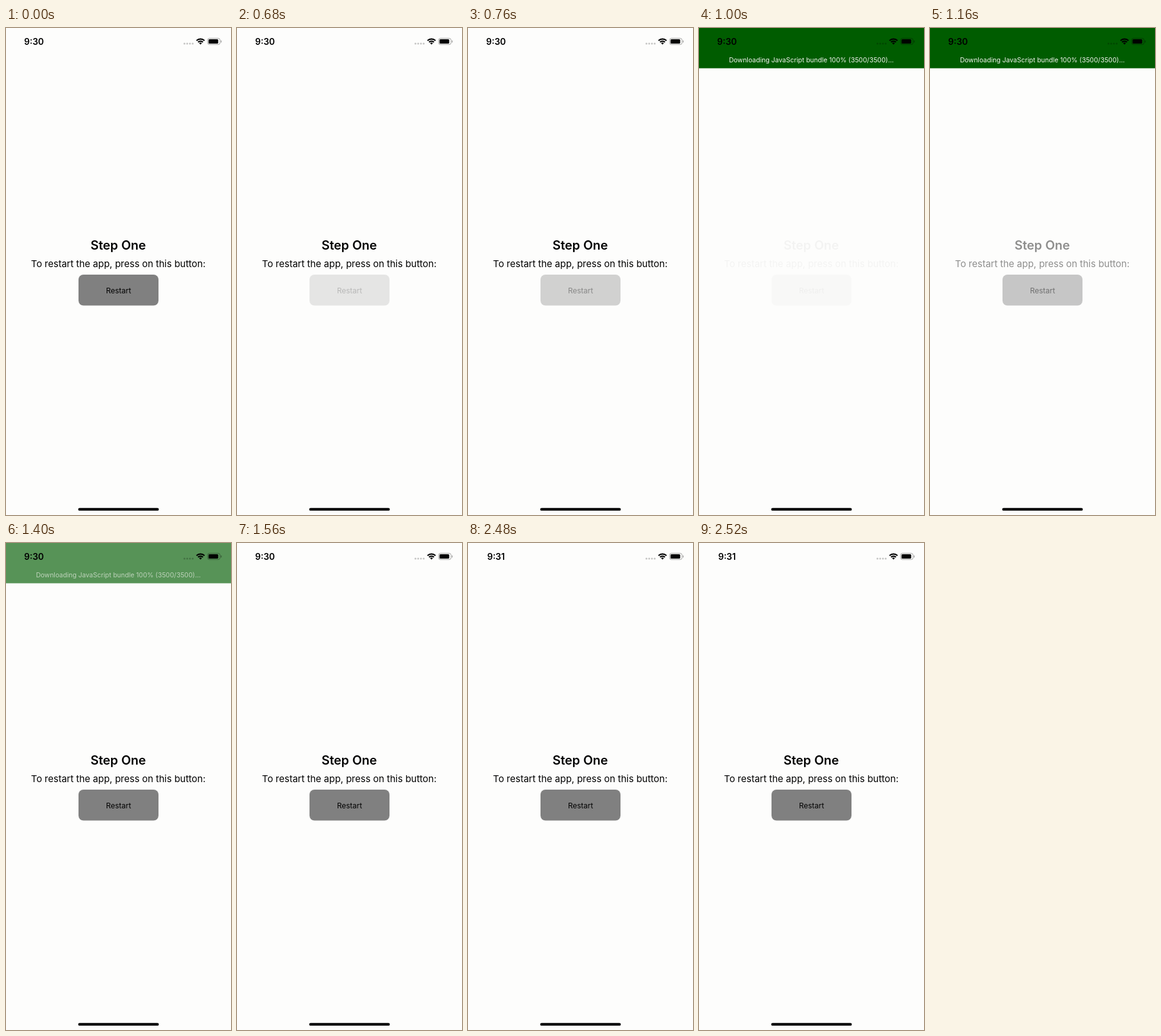
An HTML page with a canvas that plays this animation: 360 px wide and 780 px high, repeating every 2560 ms.

```html
<!DOCTYPE html>
<html lang="en">
<head>
<meta charset="utf-8">
<title>Restart button</title>
<style>
html, body { margin: 0; width: 100%; height: 100%; overflow: hidden; background: #fdfdfc; }
canvas { display: block; width: 360px; height: 780px; }
</style>
</head>
<body>
<canvas id="stage"></canvas>
<script>
const W = 360, H = 780, LOOP = 2560, STEP = 40;
const PAPER = '#fdfdfc', INK = '#000', GREEN = '#005c00';
const PRESS = 680, BANNER = 800, RELOAD = 920, MINUTE = 2480;
const canvas = document.getElementById('stage');
const ctx = canvas.getContext('2d');
const dpr = window.devicePixelRatio || 1;
canvas.width = W * dpr;
canvas.height = H * dpr;
ctx.scale(dpr, dpr);

const ramp = (t, from, to) => Math.min(1, Math.max(0, (t - from) / (to - from)));
const ease = k => k * k * (3 - 2 * k);

function box(x, y, w, h, r, color) {
  ctx.fillStyle = color;
  ctx.beginPath();
  ctx.roundRect(x, y, w, h, r);
  ctx.fill();
}

function label(text, x, y, size, weight = 400, color = INK) {
  ctx.font = `${weight} ${size}px Inter, "Noto Sans", sans-serif`;
  ctx.textAlign = 'center';
  ctx.fillStyle = color;
  ctx.fillText(text, x, y);
}

function faded(alpha, draw) {
  if (alpha <= 0) return;
  ctx.save();
  ctx.globalAlpha = alpha;
  draw();
  ctx.restore();
}

function button() {
  box(116, 395, 128, 49.5, 8, '#808080');
  label('Restart', 180, 424.5, 12);
}

function content() {
  label('Step One', 179.5, 355, 20, 600);
  label('To restart the app, press on this button:', 179.7, 382.5, 15);
}

function banner() {
  box(0, 0, W, 64.6, 0, GREEN);
  label('Downloading JavaScript bundle 100% (3500/3500)...', 179.7, 55, 10.5, 400, '#f4f4f0');
}

function wifi(x, y) {
  ctx.strokeStyle = ctx.fillStyle = INK;
  ctx.lineWidth = 2.2;
  const a = Math.PI * 0.25;
  for (const r of [5.5, 9]) {
    ctx.beginPath();
    ctx.arc(x, y, r, -Math.PI / 2 - a, -Math.PI / 2 + a);
    ctx.stroke();
  }
  ctx.beginPath();
  ctx.moveTo(x, y);
  ctx.arc(x, y, 3.1, -Math.PI / 2 - a, -Math.PI / 2 + a);
  ctx.fill();
}

function battery() {
  const shade = 'rgba(0, 0, 0, 0.35)';
  ctx.strokeStyle = shade;
  ctx.lineWidth = 1;
  ctx.beginPath();
  ctx.roundRect(322.5, 16.5, 20, 10, 3);
  ctx.stroke();
  box(324, 18, 15.5, 7, 1.5, INK);
  box(343.8, 19.8, 1.3, 3.6, 0.7, shade);
}

function statusBar(t) {
  label(t < MINUTE ? '9:30' : '9:31', 44.8, 26.5, 14, 600);
  for (let i = 0; i < 4; i++) box(284 + i * 4.4, 23.5, 3, 3, 1.5, 'rgba(0, 0, 0, 0.22)');
  wifi(311.2, 26.6);
  battery();
}

function draw(now) {
  const t = Math.floor((now % LOOP) / STEP) * STEP;
  box(0, 0, W, H, 0, PAPER);

  if (t < RELOAD) {
    content();
    const press = t < PRESS ? 1 : 0.2 + 0.8 * ease(ramp(t, 690, 940));
    faded(press, button);
  } else {
    faded(ramp(t, 985, 1385), () => { content(); button(); });
  }

  if (t >= BANNER) faded(1 - ramp(t, 1315, 1560), banner);
  statusBar(t);
  box(115.5, 768.7, 129, 4.4, 2.2, INK);
}

const start = performance.now();
function tick() {
  draw(performance.now() - start);
  requestAnimationFrame(tick);
}
tick();
</script>
</body>
</html>
```
